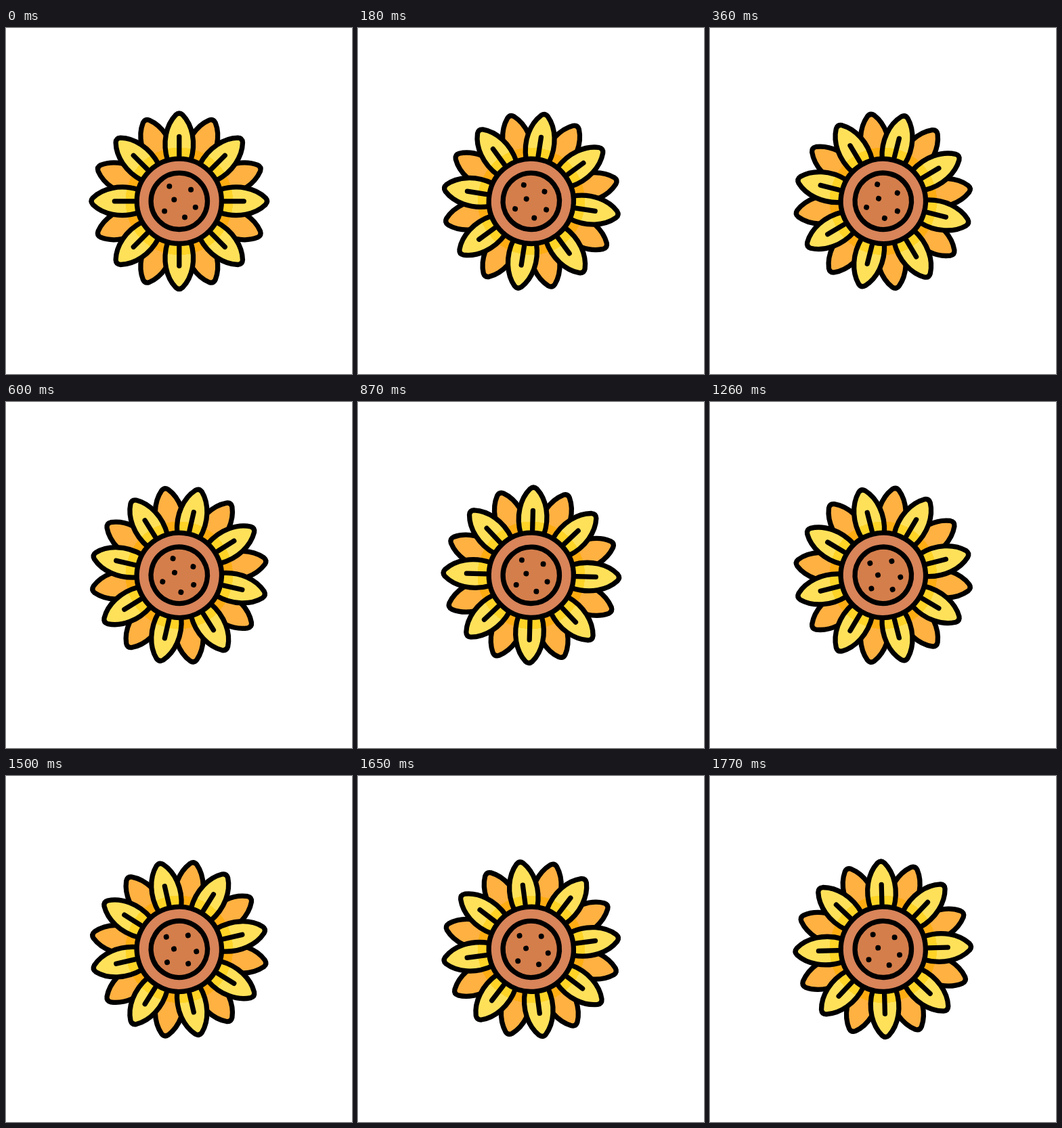
These frames come from a looping animation (511 px wide and 511 px high, 1.8 s). An HTML page:

```html
<!DOCTYPE html>
<html lang="en">
<head>
<meta charset="utf-8">
<title>Swaying sunflower</title>
<style>
  html, body { margin: 0; width: 100%; height: 100%; overflow: hidden; background: #fff; }
  svg { display: block; width: 100vw; height: 100vh; }
</style>
</head>
<body>
<svg viewBox="0 0 511 511">
  <defs>
    <path id="petal" d="M-17-60C-25.5-87-19-113-5-127.5Q0-132 5-127.5C19-113 25.5-87 17-60Z"/>
    <radialGradient id="yellow" gradientUnits="userSpaceOnUse" cx="0" cy="0" r="130">
      <stop offset=".61" stop-color="#ffd426"/>
      <stop offset=".61" stop-color="#ffe159"/>
    </radialGradient>
    <radialGradient id="orange" gradientUnits="userSpaceOnUse" cx="0" cy="0" r="130">
      <stop offset=".61" stop-color="#ffac12"/>
      <stop offset=".61" stop-color="#ffb141"/>
    </radialGradient>
  </defs>
  <g id="flower" stroke="#000" stroke-width="7.3" stroke-linecap="round" stroke-linejoin="round">
    <g id="petals"></g>
    <circle r="62.6" fill="#d98459"/>
    <circle r="41.7" fill="#d47e4b"/>
    <g id="seeds" stroke="none"></g>
  </g>
</svg>
<script>
  const PERIOD = 1800, STEP = 30, SWING = 15, CENTER = 255.8;
  const flower = document.getElementById('flower');
  const seeds = [[-14.5, -22], [17.3, -17], [-7.5, -2.2], [24, 9], [-21.7, 14.8], [8.2, 23.8]];

  const ring = (start, fill, vein = '') => Array.from({ length: 8 }, (_, i) =>
    `<g transform="rotate(${start + i * 45})"><use href="#petal" fill="url(#${fill})"/>${vein}</g>`).join('');

  document.getElementById('petals').innerHTML =
    ring(22.5, 'orange') + ring(0, 'yellow', '<path d="M0-67V-95.5"/>');
  document.getElementById('seeds').innerHTML =
    seeds.map(([x, y]) => `<circle cx="${x}" cy="${y}" r="4"/>`).join('');

  const begin = performance.now();
  function draw() {
    const t = Math.floor((performance.now() - begin) / STEP) * STEP;
    const angle = SWING * Math.sin(t / PERIOD * 2 * Math.PI);
    flower.setAttribute('transform', `translate(${CENTER} ${CENTER}) rotate(${angle})`);
    requestAnimationFrame(draw);
  }
  draw();
</script>
</body>
</html>
```
